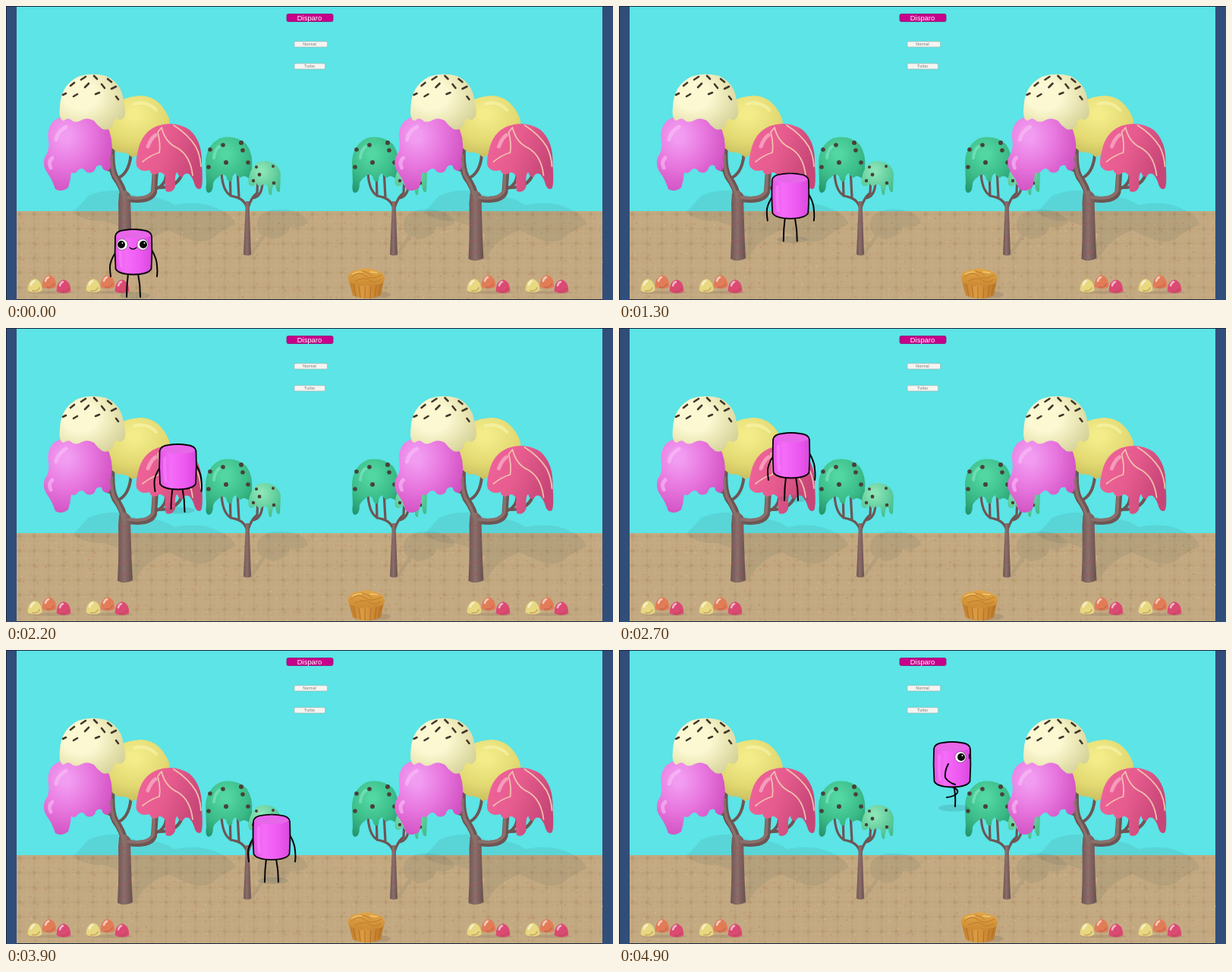
Animation of 800x387 px, one loop 5000 ms. Source, as an HTML page:

```html
<!DOCTYPE html>
<html lang="es">
<head>
<meta charset="utf-8">
<title>Disparo</title>
<style>
html, body { margin: 0; width: 100%; height: 100%; overflow: hidden; background: #314d79; }
svg { display: block; width: 100vw; height: 100vh; }
text { font-family: "Liberation Sans", Arial, sans-serif; text-anchor: middle; }
.line { fill: none; stroke-linecap: round; stroke-linejoin: round; }
</style>
</head>
<body>
<svg viewBox="0 0 800 387" preserveAspectRatio="none">
<defs>
  <radialGradient id="cream" cx=".32" cy=".38" r=".75"><stop offset=".35" stop-color="#fbf8d2"/><stop offset=".65" stop-color="#ebe7b6"/><stop offset="1" stop-color="#d5d29a"/></radialGradient>
  <radialGradient id="lemon" cx=".5" cy=".3" r=".75"><stop offset=".1" stop-color="#f3ec89"/><stop offset=".6" stop-color="#e2d972"/><stop offset="1" stop-color="#c3ba5c"/></radialGradient>
  <radialGradient id="violet" cx=".32" cy=".3" r=".75"><stop offset=".1" stop-color="#f19bf1"/><stop offset=".5" stop-color="#e878df"/><stop offset="1" stop-color="#d04fc0"/></radialGradient>
  <linearGradient id="berry" y2=".4"><stop offset="0" stop-color="#f0659b"/><stop offset=".5" stop-color="#e75c8f"/><stop offset="1" stop-color="#c84677"/></linearGradient>
  <radialGradient id="mint" cx=".4" cy=".3" r=".75"><stop offset=".1" stop-color="#52d6a2"/><stop offset=".6" stop-color="#3abb88"/><stop offset="1" stop-color="#25966c"/></radialGradient>
  <radialGradient id="pale" cx=".4" cy=".3" r=".75"><stop offset=".1" stop-color="#8be5b6"/><stop offset="1" stop-color="#45bd8b"/></radialGradient>
  <linearGradient id="bark"><stop offset="0" stop-color="#6d5553"/><stop offset=".45" stop-color="#8b6f6b"/><stop offset="1" stop-color="#684f4d"/></linearGradient>
  <linearGradient id="skin"><stop offset="0" stop-color="#e456e6"/><stop offset=".3" stop-color="#f56cf9"/><stop offset=".7" stop-color="#ec58f0"/><stop offset="1" stop-color="#d848dc"/></linearGradient>
  <linearGradient id="cake"><stop offset="0" stop-color="#bf7a2a"/><stop offset=".4" stop-color="#dc9c42"/><stop offset="1" stop-color="#bb7526"/></linearGradient>
  <linearGradient id="crust" x2="0" y2="1"><stop offset="0" stop-color="#e2a647"/><stop offset="1" stop-color="#cb8a32"/></linearGradient>
  <pattern id="wafer" width="19.3" height="19.3" patternUnits="userSpaceOnUse" x="14" y="270">
    <rect width="19.3" height="19.3" fill="#c3a981"/>
    <path d="M0 4H19.3M4 0V19.3" stroke="#bca178" stroke-width="1.4"/>
    <path d="M0 13.5H19.3M13.5 0V19.3" stroke="#c8ae86" stroke-width="1"/>
    <rect x="2" y="2" width="4" height="4" fill="#b69a71"/>
  </pattern>

  <path id="bigShade" fill="#3d4f55" opacity=".1" d="M88 272Q98 262 108 250Q128 241 150 243L172 250Q204 249 222 262Q258 255 282 268Q303 278 302 288Q287 293 278 301Q266 314 246 309Q226 301 214 295Q193 303 181 316L168 334L160 334L169 300Q145 287 128 283Q108 285 88 272Z"/>
  <path id="smallShade" fill="#3d4f55" opacity=".1" d="M319 328L337 302Q326 290 334 277Q345 265 371 268Q397 273 398 286Q388 293 374 291Q371 304 351 307L342 303L324 329Z"/>

  <g id="bigTree">
    <g class="line" stroke="#6d5553">
      <path d="M157 254Q154 238 144 225Q138 214 139 190" stroke-width="9"/>
      <path d="M141 216Q129 217 128 205M149 226Q164 218 165 190" stroke-width="4"/>
      <path d="M162 254Q190 258 195 245L197 215" stroke-width="8"/>
      <path d="M199 239Q230 240 233 215M199 240Q213 234 211 215" stroke-width="4"/>
    </g>
    <path d="M149 246Q158 239 164 249Q165 300 167 332Q157 338 147 333Q149 295 148 260Z" fill="url(#bark)"/>
    <g class="line" stroke="#8b6f6b">
      <path d="M156 253Q151 236 142 222Q138 209 139 197M161 252Q187 256 194 243L195 222" stroke-width="4"/>
      <path d="M150 262Q163 257 164 266Q162 275 154 269M149 288Q159 287 164 277M149 310Q158 312 165 302M150 327L162 322" stroke="#a2555e" stroke-width="1"/>
    </g>
    <path d="M122 145Q148 119 178 118Q203 119 215 148Q219 172 210 184Q199 199 184 199Q174 194 166 199Q157 191 148 193Q130 183 124 160Z" fill="url(#lemon)"/>
    <path class="line" d="M169 129Q186 124 198 137" stroke="#fbf7b0" stroke-width="4" opacity=".6"/>
    <path d="M62 152Q76 142 96 140Q123 143 136 164Q143 184 137 202Q141 213 134 217Q127 217 126 210Q119 208 117 216Q112 222 105 218Q101 211 95 216Q91 222 86 219Q85 230 82 239Q73 246 65 241Q61 229 56 222Q47 211 51 199Q58 190 56 177Q53 163 62 152Z" fill="url(#violet)"/>
    <path class="line" d="M66 176Q68 165 79 159M61 200Q55 205 59 213" stroke="#fac0f7" stroke-width="5" opacity=".6"/>
    <path d="M71 132Q72 105 95 93Q112 87 132 92Q153 102 155 125Q159 140 156 146Q151 153 146 148Q141 150 141 157Q134 165 127 162Q120 157 116 151Q107 146 100 150Q91 155 86 150Q82 146 76 151Q69 150 71 132Z" fill="url(#cream)"/>
    <path class="line" d="M99 97l6-4M116 92l4 4M134 96l5 4M85 105l5-4M104 107l5-5M126 103l4 5M139 109l6-3M75 117l4-2M89 119l5-3M118 116l5-2M145 119l3 4" stroke="#42372c" stroke-width="2.6"/>
    <path d="M174 190Q179 166 199 158Q222 150 242 163Q259 178 258 208Q260 235 257 240Q252 243 249 236Q246 225 241 221Q235 219 233 225Q227 225 226 219Q222 219 223 238Q219 247 211 244Q209 238 210 224Q204 216 199 221Q192 224 189 216Q179 219 174 213Q169 210 174 190Z" fill="url(#berry)"/>
    <path class="line" d="M180 205Q191 196 202 193Q204 181 200 166L205 160M205 160Q210 180 226 187Q243 197 246 223M221 157Q240 169 250 185Q256 196 257 211" stroke="#f1bfae" stroke-width="1.8"/>
    <path class="line" d="M187 185Q191 174 197 170" stroke="#fbb5cc" stroke-width="5" opacity=".7"/>
  </g>

  <g id="mintTree">
    <g class="line" stroke="#6d5553" stroke-width="3.2">
      <path d="M318 267Q315 254 301 251Q286 249 284 220M296 250L295 215M307 252L305 215M319 266Q323 252 331 246L332 225M325 253Q338 251 338 230"/>
    </g>
    <path d="M316 257H320.5L323 327Q318 330 313 327Z" fill="url(#bark)"/>
    <path class="line" d="M314.5 287l6-6M314 308l7-6" stroke="#a2555e"/>
    <path d="M263 207Q263 184 282 174Q302 169 317 182Q326 195 324 214Q331 222 329 231Q323 233 319 226Q313 222 309 226Q305 225 303 220Q298 222 298 230Q292 234 290 224Q285 219 280 225Q274 229 273 234Q273 245 267 246Q262 245 264 233Z" fill="url(#mint)"/>
    <path class="line" d="M274 200Q275 189 281 185" stroke="#94f0ce" stroke-width="4" opacity=".5"/>
    <path d="M321 222Q326 204 341 204Q359 205 362 221L361 244Q357 248 355 236Q351 234 350 248Q346 252 345 237Q340 232 336 237Q332 238 330 233Q326 239 321 236Q318 232 321 222Z" fill="url(#pale)"/>
    <g fill="#4a4038">
      <circle cx="286" cy="183" r="2.8"/><circle cx="310" cy="180" r="3"/><circle cx="269" cy="189" r="2.8"/><circle cx="312" cy="190" r="2.8"/><circle cx="267" cy="212" r="2.8"/><circle cx="290" cy="206" r="3"/><circle cx="319" cy="206" r="2.8"/>
      <circle cx="330" cy="212" r="2"/><circle cx="352" cy="211" r="2"/><circle cx="334" cy="222" r="2.4"/><circle cx="353" cy="233" r="2.3"/><circle cx="326" cy="230" r="2.2"/>
    </g>
  </g>

  <path id="drop" d="M-9.5 6Q-9-7 0-9Q9-7 9.5 6Q7 9 0 9Q-7 9-9.5 6Z"/>
  <g id="sweets">
    <ellipse cx="60" cy="377" rx="30" ry="2" fill="#5b4a42" opacity=".15"/>
    <use href="#drop" x="57" y="363" fill="#e27c57"/>
    <use href="#drop" x="38" y="368" fill="#e8d880"/>
    <use href="#drop" x="76" y="369" fill="#db4a72"/>
    <path class="line" d="M33 367q1-4 4-5M52 362q1-4 4-5M71 368q1-4 4-5" stroke="#fff" stroke-width="2.6" opacity=".6"/>
    <path class="line" d="M35 375q7 1 9-4M54 370q7 1 9-4M73 376q7 1 9-4" stroke="#8a4a38" stroke-width="2" opacity=".3"/>
  </g>
</defs>

<rect width="800" height="387" fill="#314d79"/>
<rect x="14" width="772" height="270" fill="#5ce4e6"/>
<rect x="14" y="270" width="772" height="117" fill="url(#wafer)"/>
<g id="crumbs" opacity=".65"></g>
<use href="#bigShade"/><use href="#bigShade" x="462.5"/>
<use href="#smallShade"/><use href="#smallShade" x="193"/>
<use href="#mintTree"/><use href="#mintTree" x="193"/>
<use href="#bigTree"/><use href="#bigTree" x="462.5"/>
<use href="#sweets"/><use href="#sweets" x="77"/><use href="#sweets" x="579"/><use href="#sweets" x="656"/>

<ellipse cx="483" cy="380" rx="24" ry="5" fill="#5b4a42" opacity=".18"/>
<path d="M452 361L457 381Q475 389 494 381L498 361Z" fill="url(#cake)"/>
<path class="line" d="M458 366l3 16M465 368l2 16M473 369v16M481 369l-1 16M488 368l-2 15M494 365l-3 15" stroke="#b06f24" stroke-width="1"/>
<path d="M451 357Q452 348 466 347Q476 343 487 348Q499 350 499 360Q496 368 488 366Q482 371 475 367Q466 371 461 366Q450 366 451 357Z" fill="url(#crust)"/>
<path class="line" d="M455 357Q465 348 473 355T495 354M460 362Q473 356 479 361T494 360M468 349Q477 350 482 355" stroke="#bd7b2a" stroke-width="1"/>
<path class="line" d="M456 353Q463 349 469 350M480 350L489 351" stroke="#f2c975" stroke-width="1.3"/>

<rect x="370" y="10.5" width="61" height="10" rx="2" fill="#c7008b" stroke="#8d1470" stroke-width=".8"/>
<text x="400" y="19" font-size="9.4" fill="#fff">Disparo</text>
<g fill="#f5f5f2" stroke="#a7b6b4" stroke-width=".7">
  <rect x="380" y="46.7" width="43.5" height="7.3" rx="1.6"/>
  <rect x="380" y="75.7" width="40.5" height="7.3" rx="1.6"/>
</g>
<g font-size="5.4" fill="#777"><text x="400" y="52.3">Normal</text><text x="400" y="81.3">Turbo</text></g>

<g id="hero"></g>
<path d="M0 .5H800M.5 0V387M14 386.5H786" stroke="#17263c" fill="none"/>
</svg>
<script>
const LOOP = 5000, STEP = 100;
const hero = document.getElementById("hero");

// time, centre x, body top, view used while travelling to this point
const route = [
  [0, 168, 294, "front"], [200, 168, 294, "front"], [700, 225.5, 299, "side"],
  [1700, 226, 168, "back"], [2700, 227, 138, "back"], [3220, 227, 295, "front"],
  [3400, 279.5, 295, "side"], [3640, 350, 295, "side"], [4260, 350, 108, "back"],
  [4400, 397, 108, "side"], [4900, 439, 121, "side"]
];

const bent = { legs: "M4 58Q7 66 4 70Q-1 73-9 72M5 70Q0 72 1 77Q0 82-4 85", arm: "M-4 33Q0 41 4 47Q8 54 8 61" };
const pass = { legs: "M-2 58Q9 62 7 67Q3 72-7 73M2 58Q5 68 4 85", arm: "M-5 29Q-10 38-9 47Q-4 54 4 56" };
const stride = { legs: "M8 59L-17 80M-9 58L19 82", arm: "M-4 33Q-16 38-21 46Q-25 50-26 56" };
const walk = [bent, pass, bent, stride];

function random(seed) {
  return () => (seed = (seed * 16807) % 2147483647) / 2147483647;
}

function scatterCrumbs() {
  const rnd = random(71), colors = ["#cf5f86", "#d9c475", "#cc7d62", "#dcc8a4", "#a78b69"];
  let dots = "";
  for (let y = 275; y < 385; y += 9.65) {
    for (let x = 18; x < 784; x += 9.65) {
      if (rnd() < .5) dots += `<rect x="${(x + rnd() * 5).toFixed(1)}" y="${(y + rnd() * 4).toFixed(1)}" width="1.6" height="1.4" fill="${colors[Math.floor(rnd() * 5)]}"/>`;
    }
  }
  document.getElementById("crumbs").innerHTML = dots;
}

const line = (d, width = 2) => `<path class="line" d="${d}" stroke="#080408" stroke-width="${width}"/>`;
const eye = (x, y, dx) => `<circle cx="${x}" cy="${y}" r="7.2" fill="#fff" stroke="#333" stroke-width=".5"/>
  <circle cx="${x + dx}" cy="${y}" r="5" fill="#080808"/><circle cx="${x + dx + 1.5}" cy="${y - 2}" r=".9" fill="#fff"/>`;

function body() {
  return `<path d="M-24 9Q-23 2-12 1Q0-1 12 1Q23 2 24 9Q25 30 23.5 52Q20 59 0 59.5Q-20 59-23.5 52Q-25 30-24 9Z" fill="url(#skin)" stroke="#080408" stroke-width="1.8"/>
    <path d="M-23 8Q-20 3 0 1.2Q20 3 23 8Q17 12.5 0 12.5Q-17 12.5-23 8Z" fill="#e767e9"/>
    <path d="M-17 18Q-18 35-16 49" class="line" stroke="#ff9bff" stroke-width="4" opacity=".35"/>`;
}

function figure(view, tick, moving) {
  if (view === "side") {
    const pose = walk[tick % 4];
    return line(pose.legs) + body() + eye(11, 20, 1) +
      `<path d="M22 15Q25 19 22 23Z" fill="#080408"/>` + line(pose.arm);
  }
  const lift = moving && tick % 2 === 0 ? 4 : 0;
  const limbs = line(`M-7 58Q-9 73-9 ${89 - lift}M6 58Q9 73 9 89`) +
    line("M-24 31Q-31 42-31 50Q-31 56-30 62M24 27Q31 39 31 48Q32 56 31 62");
  const face = view === "front" ? eye(-15, 20, -1) + eye(12, 20, 1) + line("M-5 24Q-1 28 4 24", 1.3) : "";
  return limbs + body() + face;
}

function draw(time) {
  const t = Math.floor(time % LOOP / STEP) * STEP;
  const i = Math.max(1, route.findIndex(p => t <= p[0]));
  const [t0, x0, y0] = route[i - 1], [t1, x1, y1, view] = route[i];
  const k = (t - t0) / (t1 - t0);
  const x = x0 + (x1 - x0) * k, y = y0 + (y1 - y0) * k;
  hero.setAttribute("transform", `translate(${x.toFixed(2)} ${y.toFixed(2)})`);
  hero.innerHTML = `<ellipse cx="2" cy="87" rx="20" ry="4.5" fill="#315058" opacity=".16"/>` + figure(view, t / STEP, i > 1 && k < 1);
}

function frame(now) {
  draw(now);
  requestAnimationFrame(frame);
}

scatterCrumbs();
draw(0);
requestAnimationFrame(frame);
</script>
</body>
</html>
```
